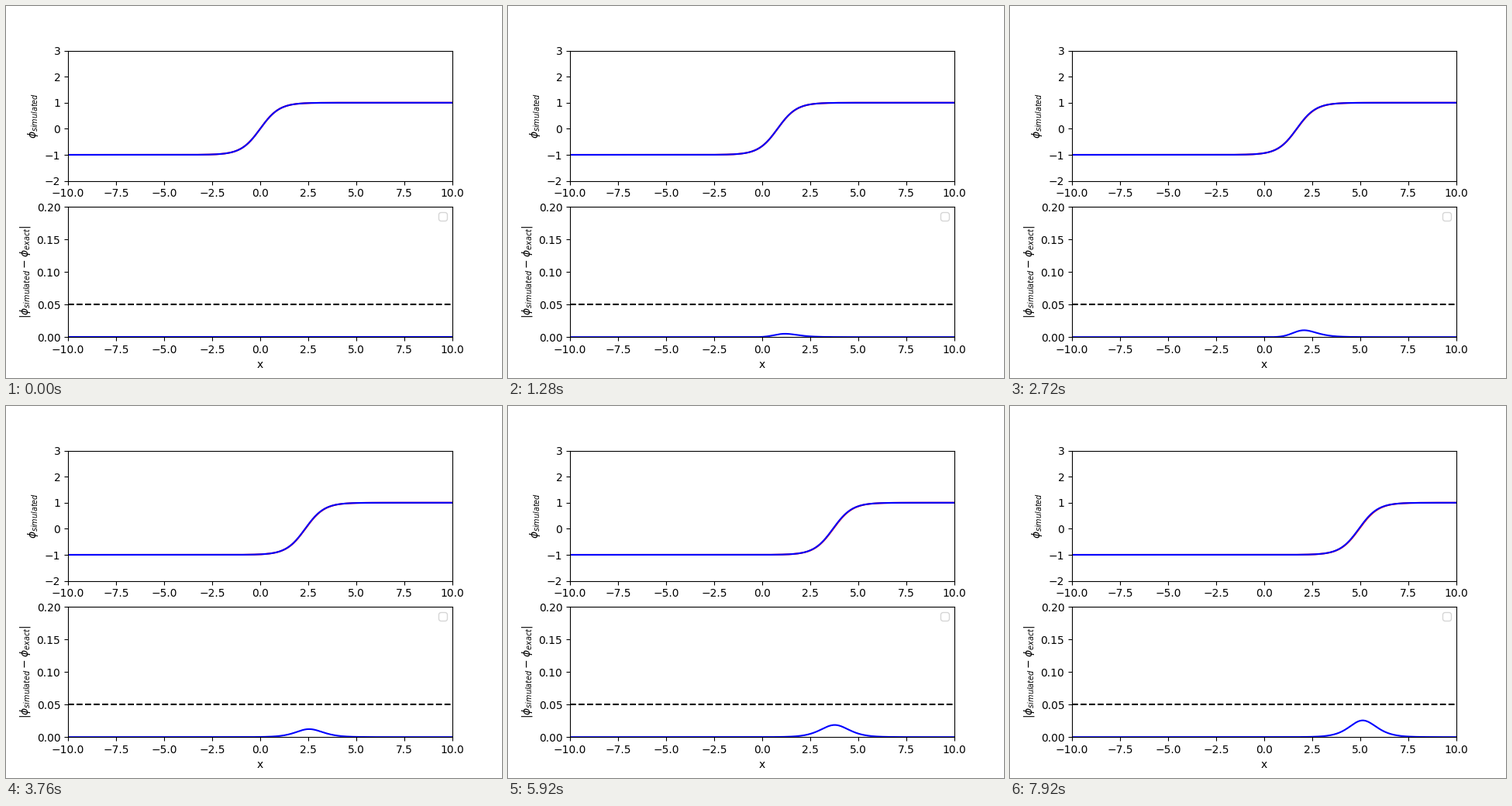
Animation, 640 px wide and 480 px high, one loop 8000 ms. Source, as a matplotlib script:

```python
import numpy as np
import matplotlib.pyplot as plt
from matplotlib.animation import FuncAnimation

FRAMES, INTERVAL = 100, 80
STEP = 0.05            # kink travel per frame
DRIFT = 0.00025        # lag of the numerical kink per frame
BREATH = 0.005         # amplitude of the width oscillation
BREATH_PERIOD = 63     # in frames

x = np.linspace(-10, 10, 401)


def exact(n):
    return np.tanh(x - STEP * n)


def deviation(n):
    """Translation lag plus an oscillating width error of the kink."""
    phi = exact(n)
    width = BREATH * (1 - np.cos(2 * np.pi * n / BREATH_PERIOD))
    return (1 - phi**2) * (DRIFT * n + width * phi)


fig, (top, bottom) = plt.subplots(2, 1, figsize=(6.4, 4.8), dpi=100)

exact_line, = top.plot(x, exact(0), color="red")
sim_line, = top.plot(x, exact(0), color="blue")
top.set(xlim=(-10, 10), ylim=(-2, 3), ylabel=r"$\phi_{simulated}$")
top.set_yticks(range(-2, 4))

bottom.plot([-10, 10], [0.05, 0.05], "k--")
error_line, = bottom.plot(x, np.zeros_like(x), color="blue")
bottom.set(xlim=(-10, 10), ylim=(0, 0.2), xlabel="x",
           ylabel=r"$|\phi_{simulated} - \phi_{exact}|$")
bottom.set_yticks(np.arange(5) * 0.05)
bottom.legend([], [], loc="upper right")


def update(n):
    delta = deviation(n)
    exact_line.set_ydata(exact(n))
    sim_line.set_ydata(exact(n) + delta)
    error_line.set_ydata(np.abs(delta))
    return exact_line, sim_line, error_line


anim = FuncAnimation(fig, update, frames=FRAMES, interval=INTERVAL,
                     repeat=True, repeat_delay=0)
plt.show()
```
